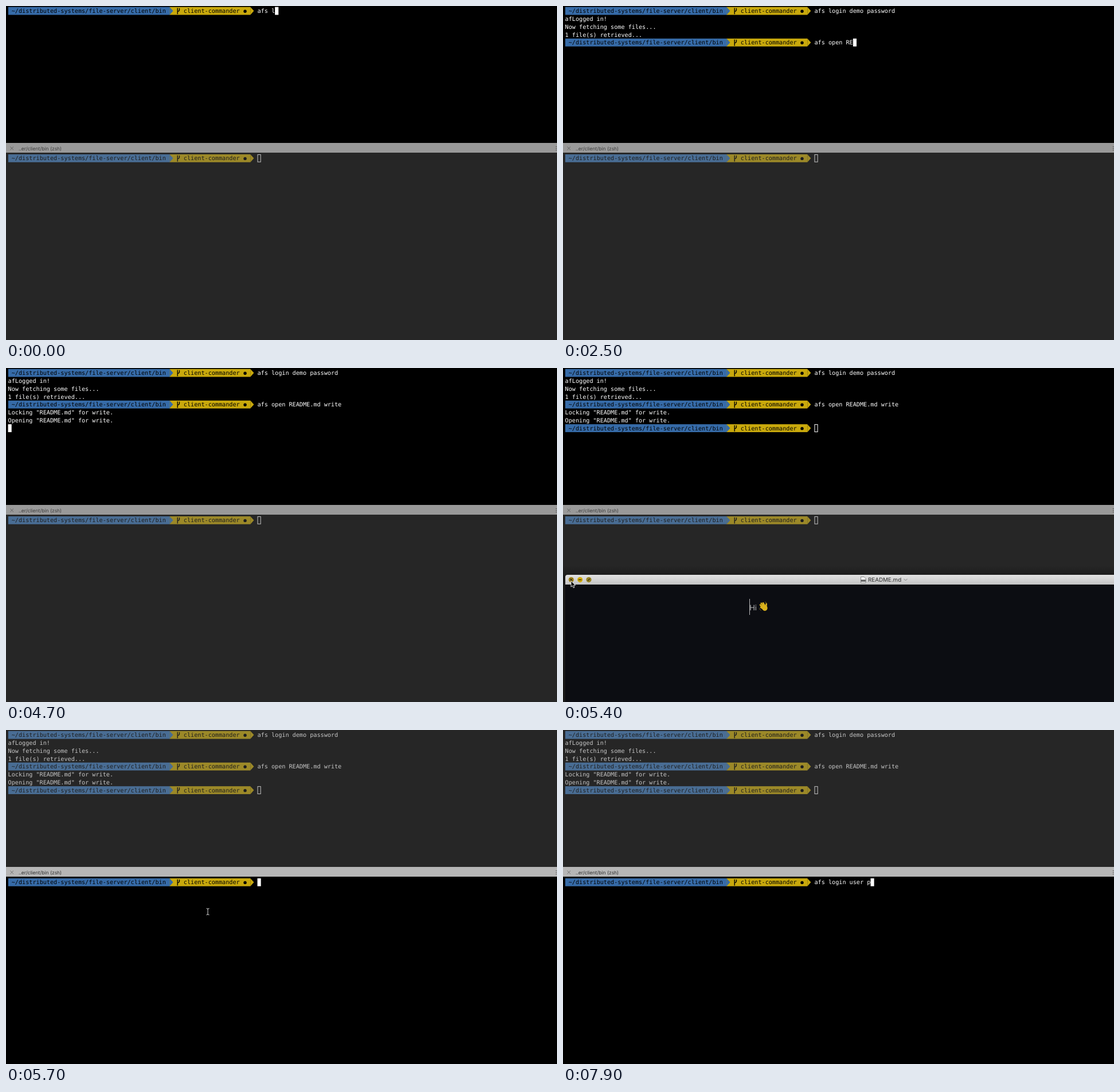
An HTML page for the animation above (8 s loop, 961 by 583 pixels).

```html
<!DOCTYPE html>
<html lang="en">
<head>
<meta charset="utf-8">
<title>Terminal session</title>
<style>
html, body { margin: 0; width: 100%; height: 100%; overflow: hidden; background: #000; }
svg { display: block; width: 961px; height: 583px; }
text { white-space: pre; text-rendering: geometricPrecision; }
.mono { font: 10.173px "DejaVu Sans Mono", monospace; }
.ui { font-family: Inter, sans-serif; }
</style>
</head>
<body>
<svg id="stage" viewBox="0 0 961 583"></svg>
<script>
const LOOP = 8000, TICK = 100;
const X0 = 3.6, CW = 6.125, LH = 13.78, BOTTOM = 257.2;
const BRIGHT = { bg: '#000', blue: '#366ba8', gold: '#c9a90c', ink: '#000', text: '#fff' };
const DIM = { bg: '#262626', blue: '#496d94', gold: '#9c8928', ink: '#1e1e1e', text: '#c6c6c6' };

const col = n => X0 + n * CW;
const rowY = row => 1.7 + row * LH;
const rect = (x, y, w, h, fill, more = '') =>
  `<rect x="${x}" y="${y}" width="${w}" height="${h}" fill="${fill}" ${more}/>`;
const path = (d, more) => `<path d="${d}" ${more}/>`;
const stroke = (color, width) => `fill="none" stroke="${color}" stroke-width="${width}"`;
const mono = (c, row, s, fill) =>
  `<text class="mono" x="${col(c)}" y="${rowY(row) + 10.5}" fill="${fill}">${s}</text>`;
const ui = (x, y, size, s, fill) =>
  `<text class="ui" x="${x}" y="${y}" font-size="${size}" fill="${fill}">${s}</text>`;

// Piecewise linear value through [time, value] points.
function at(t, points) {
  if (t <= points[0][0]) return points[0][1];
  for (let i = 1; i < points.length; i++) {
    const [a, u] = points[i - 1], [b, v] = points[i];
    if (t <= b) return u + (v - u) * (t - a) / (b - a);
  }
  return points[points.length - 1][1];
}
const typed = (t, s, points) => s.slice(0, Math.round(at(t, points)));

function shellLine(row, cmd, p) {
  const y = rowY(row), mid = y + LH / 2, end = y + LH;
  const tip = (c, fill) => path(`M${col(c)} ${y}L${col(c + 1)} ${mid}L${col(c)} ${end}Z`, `fill="${fill}"`);
  const bx = col(48);
  return rect(col(0) + .3, y, col(46) - col(0), LH, p.blue) +
    rect(col(46), y, col(69) - col(46), LH, p.gold) +
    tip(46, p.blue) + tip(69, p.gold) +
    mono(1, row, '~/distributed-systems/file-server/client/bin', p.ink) +
    path(`M${bx + 1.6} ${y + 1.8}v10.8M${bx + 4.8} ${y + 2}v3.2q0 1.6-3.2 3`, stroke(p.ink, 1.4)) +
    mono(50, row, 'client-commander', p.ink) +
    `<circle cx="${col(67) + 3}" cy="${mid + .6}" r="2.7" fill="${p.ink}"/>` +
    mono(71, row, cmd, p.text);
}

function cursor(c, row, solid, p) {
  return solid ? rect(col(c), rowY(row), CW, LH, '#fff')
    : rect(col(c) + .5, rowY(row) + .5, CW - 1, LH - 1, 'none', `stroke="${p.text}"`);
}

function topPane(t) {
  const p = t < 5700 ? BRIGHT : DIM;
  const login = typed(t, 'afs login demo password', [[0, 5], [400, 15], [500, 15], [1000, 22], [1100, 23]]);
  const edit = typed(t, t < 2500 ? 'afs open REDA' : 'afs open README.md write',
    [[1700, 3], [2000, 12], [2100, 12], [2200, 13], [2400, 13], [2500, 11], [2600, 12], [2700, 12],
     [2800, 13], [2900, 13], [3000, 14], [3300, 14], [3400, 15], [3700, 15], [4300, 24]]);
  let out = rect(0, 0, 961, 239, p.bg) + shellLine(0, login, p);
  let c = 71 + login.length, row = 0;
  const line = (time, r, s) => {
    if (t < time) return;
    out += mono(0, r, s, p.text);
    c = 0;
    row = r + 1;
  };
  if (t >= 1100) { c = 0; row = 1; }
  if (t >= 1300 && t < 1400) { out += mono(0, 1, 'af', p.text); c = 2; }
  line(1400, 1, 'afLogged in!');
  line(1500, 2, 'Now fetching some files...');
  line(1600, 3, '1 file(s) retrieved...');
  if (t >= 1700) { out += shellLine(4, edit, p); row = 4; c = 71 + edit.length; }
  if (t >= 4400) { row = 5; c = 0; }
  line(4600, 5, 'Locking "README.md" for write.');
  line(4700, 6, 'Opening "README.md" for write.');
  if (t >= 4800) { out += shellLine(7, '', p); c = 71; }
  return out + cursor(c, row, t < 5000, p);
}

function bottomPane(t) {
  const on = t >= 5700, p = on ? BRIGHT : DIM;
  const cmd = typed(t, 'afs login user pass', [[6300, 0], [7200, 16], [7500, 19], [7900, 16]]);
  const mark = on ? '#6f6f6f' : '#626262';
  return rect(0, 256, 961, 327, p.bg) +
    rect(0, 239, 961, 17, on ? '#b6b6b6' : '#999') +
    path('M7.4 245.6l5.6 5.6m0-5.6l-5.6 5.6', stroke(mark, 1)) +
    ui(22, 251.6, 8.45, '..er/client/bin (zsh)', on ? '#303030' : '#3c3c3c') +
    path('M958.5 245.5h3m-3 3h3m-3 3h3', stroke(mark, 1)) +
    `<g transform="translate(0 ${BOTTOM})">` + shellLine(0, cmd, p) +
    cursor(71 + cmd.length, 0, on, p) + '</g>';
}

function light(x, fill, mark) {
  return `<circle cx="${x}" cy="369.6" r="4.6" fill="${fill}"/>` +
    path(`M${x} 369.6${mark}`, stroke('#332b08', 1.2));
}

function hand() {
  return `<g ${stroke('#d9b11c', 2.7)} stroke-linecap="round">` +
    path('M349.5 419L344 413.5M350.5 417L345.8 410.8M352.5 416L349 410.2M350 421L345 417.6M354 418L354.6 411.8', '') +
    '</g><ellipse cx="352" cy="419" rx="4.6" ry="4.9" fill="#d9b11c"/>' +
    path('M342.6 419.5q.8 2.6 3 3.8M352 408.4q2.6.6 3.6 2.2', stroke('#8f7a22', .8));
}

function editor() {
  const bar = 'M4 378V365q0-4 4-4H961V378Z';
  return '<defs><linearGradient id="bar" x2="0" y2="1"><stop stop-color="#e2e2e2"/>' +
    '<stop offset="1" stop-color="#c4c4c4"/></linearGradient>' +
    '<linearGradient id="shade" x2="0" y2="1"><stop stop-opacity="0"/>' +
    '<stop offset="1" stop-opacity=".25"/></linearGradient></defs>' +
    rect(0, 345, 961, 17, 'url(#shade)') + rect(0, 362, 5, 221, '#000', 'opacity=".35"') +
    rect(4, 377, 957, 206, '#0c0d12') + path(bar, 'fill="url(#bar)"') +
    light(14.3, '#a3851c', 'm-2-2l4 4m0-4l-4 4') + light(29.7, '#d0aa0c', 'm-2.6 0h5.2') +
    light(45, '#978326', 'm-1.8 1.8l3.6-3.6') +
    path('M519.5 364.5h5.5l3 3v7.5h-8.5z', 'fill="#f2f2f2" stroke="#777" stroke-width=".8"') +
    rect(519.5, 369.5, 8.5, 3.5, '#666') +
    ui(532, 373.2, 9.8, 'README.md', '#2c2c2c') +
    path('M594.5 368l3 3 3-3', stroke('#777', .9)) +
    ui(325.2, 422.6, 13, 'Hi', '#b4b4b4') + hand() +
    rect(325, 403, 1, 28, '#b8b8b8');
}

function mouse(t) {
  if (t < 5100 || t >= 6400) return '';
  if (t >= 5700) {
    return path('M349.6 311.4q2.4 0 2.4 1.8V321q0 1.8-2.4 1.8M354.4 311.4q-2.4 0-2.4 1.8M352 321q0 1.8 2.4 1.8',
      stroke('#ddd', 1));
  }
  const x = at(t, [[5100, 150], [5400, 14], [5600, 352.5]]);
  const y = at(t, [[5100, 440], [5400, 371.5], [5600, 315.5]]);
  return `<g transform="translate(${x} ${y})">` +
    path('M0 0V10.6L2.5 8.3 4.2 12.2 6 11.4 4.4 7.7H7.6Z', 'fill="#000" stroke="#fff" stroke-width=".9"') + '</g>';
}

const stage = document.getElementById('stage');
const start = performance.now();
let shown = -1;
function draw() {
  const t = Math.floor((performance.now() - start) % LOOP / TICK) * TICK;
  if (t !== shown) {
    shown = t;
    stage.innerHTML = topPane(t) + bottomPane(t) + (t >= 5000 && t < 5500 ? editor() : '') + mouse(t);
  }
  requestAnimationFrame(draw);
}
draw();
</script>
</body>
</html>
```
